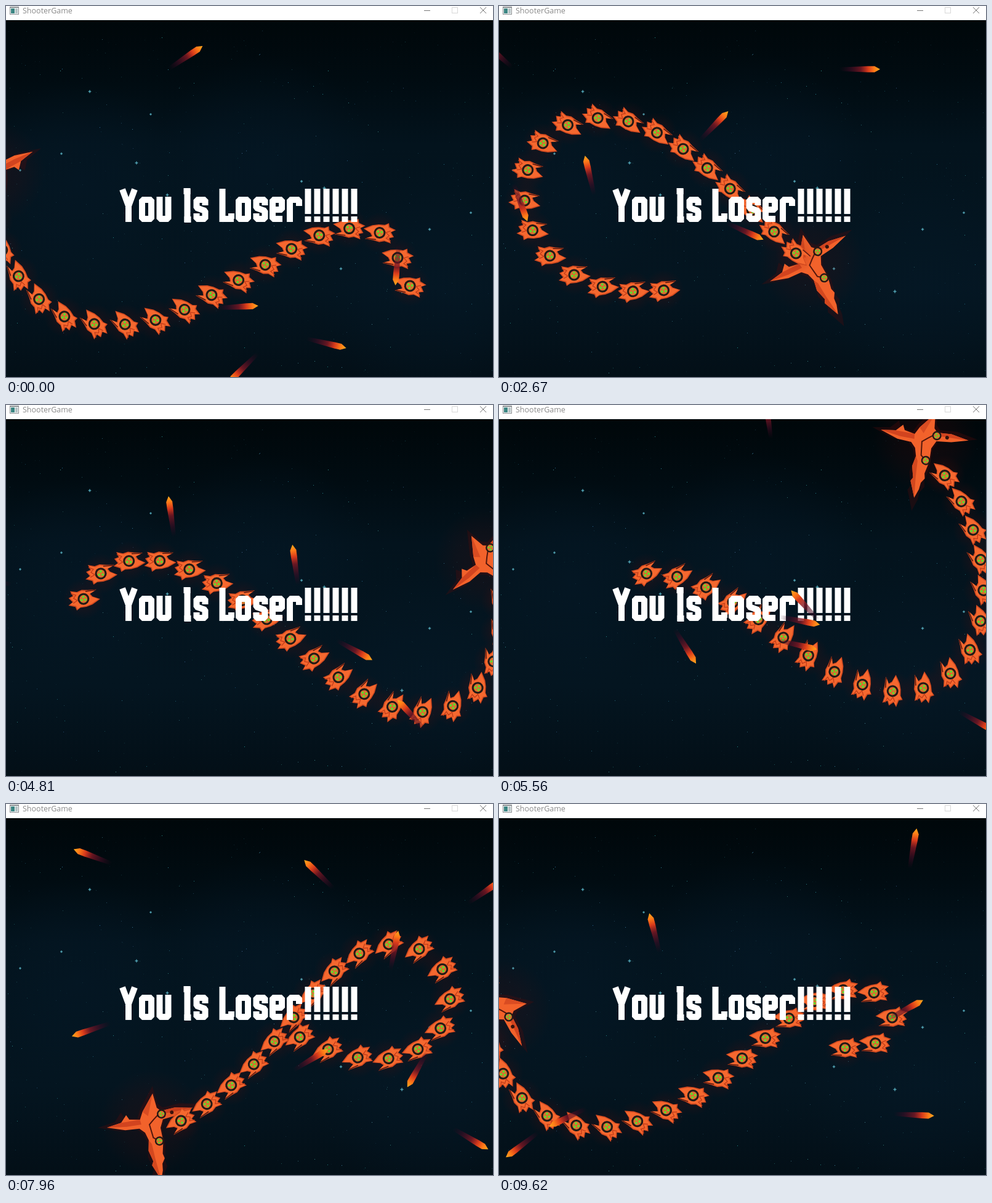
An HTML page with a canvas that plays this animation: 791x603 px, repeating every 9.67 s.

```html
<!DOCTYPE html>
<html lang="en">
<head>
<meta charset="utf-8">
<title>ShooterGame</title>
<style>
html, body { margin: 0; width: 100%; height: 100%; overflow: hidden; background: #020c13; }
canvas { display: block; }
</style>
</head>
<body>
<canvas id="stage" width="791" height="603" aria-label="You Is Loser!!!!!!">You Is Loser!!!!!!</canvas>
<script>
const W = 791, H = 603, LOOP = 9670, STEP = 92.5, LAST = 104;
const LINKS = 19, GAP = 50, RAD = Math.PI / 180;
const canvas = document.getElementById('stage');
const g = canvas.getContext('2d');

// Head route; timed stops also carry a step and a nose angle.
const route = [
  { x: -34, y: 250, step: 0, nose: 241 },
  { x: -26, y: 190 }, { x: 32, y: 108 }, { x: 110, y: 92 },
  { x: 193, y: 127, step: 14, nose: 171 },
  { x: 262, y: 178 }, { x: 340, y: 260 },
  { x: 518, y: 437, step: 29, nose: 63 },
  { x: 597, y: 506 }, { x: 689, y: 561 }, { x: 744, y: 556 },
  { x: 784, y: 518, step: 43, nose: -18 },
  { x: 812, y: 400 }, { x: 800, y: 280 }, { x: 757, y: 147 },
  { x: 688, y: 80, step: 60, nose: 101 },
  { x: 635, y: 95 }, { x: 546, y: 193 }, { x: 490, y: 320 }, { x: 412, y: 433 },
  { x: 241, y: 540, step: 86, nose: 81 },
  { x: 176, y: 562 }, { x: 60, y: 536 }, { x: -5, y: 445 },
  { x: -22, y: 343, step: LAST, nose: 158 }
];
// Where the body lies when the loop begins, head to tail.
const coil = [[-34, 250], [-8, 393], [92, 503], [239, 511], [375, 447], [507, 374], [604, 369], [654, 450]];

const mix = (a, b, u) => a + (b - a) * u;
function group(list, size) {
  const out = [];
  for (let i = 0; i < list.length; i += size) out.push(list.slice(i, i + size));
  return out;
}
function seeded(seed) {
  return () => (seed = seed * 16807 % 2147483647) / 2147483647;
}

// Smooth curve through points: lookup by length, and the length at each point.
function curve(p) {
  const n = p.length - 1, sub = 24, pts = [p[0]], len = [0];
  for (let i = 0; i < n; i++) {
    const a = p[Math.max(0, i - 1)], b = p[i], c = p[i + 1], d = p[Math.min(n, i + 2)];
    for (let s = 1; s <= sub; s++) {
      const u = s / sub;
      pts.push([0, 1].map(k => b[k] + u / 2 * (c[k] - a[k]
        + u * (2 * a[k] - 5 * b[k] + 4 * c[k] - d[k] + u * (3 * (b[k] - c[k]) + d[k] - a[k])))));
    }
  }
  for (let i = 1; i < pts.length; i++)
    len.push(len[i - 1] + Math.hypot(pts[i][0] - pts[i - 1][0], pts[i][1] - pts[i - 1][1]));
  return {
    total: len[len.length - 1],
    lengthAt: i => len[i * sub],
    at(want) {
      let i = 1;
      while (i < len.length - 1 && len[i] < want) i++;
      const u = (want - len[i - 1]) / (len[i] - len[i - 1] || 1);
      return [0, 1].map(k => mix(pts[i - 1][k], pts[i][k], u));
    }
  };
}

// Every link is dragged along at a fixed gap behind the one before it.
function pull(chain) {
  for (let i = 1; i < chain.length; i++) {
    const [hx, hy] = chain[i - 1], dx = chain[i][0] - hx, dy = chain[i][1] - hy;
    const k = GAP / (Math.hypot(dx, dy) || 1);
    chain[i] = [hx + dx * k, hy + dy * k];
  }
}

function buildWorm() {
  const path = curve(route.map(p => [p.x, p.y])), rest = curve(coil), sub = 8;
  const stops = route.map((p, i) => ({ ...p, far: path.lengthAt(i) })).filter(p => 'step' in p);
  const chain = Array.from({ length: LINKS + 1 }, (_, i) => rest.at(rest.total * i / LINKS));
  const worm = [];
  for (let s = 0; s <= LAST * sub; s++) {
    const step = s / sub, next = Math.max(1, stops.findIndex(p => p.step >= step));
    const a = stops[next - 1], b = stops[next], u = (step - a.step) / (b.step - a.step);
    chain[0] = path.at(mix(a.far, b.far, u));
    pull(chain);
    if (s % sub === 0)
      worm.push({ nose: mix(a.nose, b.nose, u * u * (3 - 2 * u)) * RAD, joints: chain.slice() });
  }
  return worm;
}

// Random links spit fireballs in random directions at a steady rate.
function buildShots() {
  const rnd = seeded(4211), shots = [];
  for (let step = -14; step < LAST; step += 2.5) {
    const { joints } = worm[Math.max(0, Math.floor(step))];
    const [x, y] = joints[1 + Math.floor(rnd() * LINKS)];
    shots.push({ step, x, y, angle: rnd() * 2 * Math.PI });
  }
  return shots;
}

function shape(c, flat, fill) {
  c.beginPath();
  group(flat, 2).forEach(([x, y]) => c.lineTo(x, y));
  c.closePath();
  c.fillStyle = fill;
  c.fill();
}
function line(c, flat, color, width) {
  c.beginPath();
  group(flat, 2).forEach(([x, y], i) => i ? c.lineTo(x, y) : c.moveTo(x, y));
  c.strokeStyle = color;
  c.lineWidth = width;
  c.stroke();
}
function disc(c, x, y, r, fill) {
  c.beginPath();
  c.arc(x, y, r, 0, 7);
  c.fillStyle = fill;
  c.fill();
}
function glow(c, x, y, r, rgb, alpha) {
  const f = c.createRadialGradient(x, y, 0, x, y, r);
  f.addColorStop(0, `rgba(${rgb},${alpha})`);
  f.addColorStop(0.55, `rgba(${rgb},${alpha * 0.6})`);
  f.addColorStop(1, `rgba(${rgb},0)`);
  c.fillStyle = f;
  c.fillRect(x - r, y - r, 2 * r, 2 * r);
}
function placed(x, y, angle, paint) {
  g.save();
  g.translate(x, y);
  g.rotate(angle);
  paint();
  g.restore();
}

function buildSky() {
  const sky = document.createElement('canvas');
  sky.width = W;
  sky.height = H;
  const c = sky.getContext('2d'), rnd = seeded(77);
  const base = c.createLinearGradient(0, 23, 0, H);
  [[0, '#00070a'], [0.18, '#010c12'], [0.35, '#03131d'], [0.75, '#041520'], [1, '#030f17']]
    .forEach(s => base.addColorStop(...s));
  c.fillStyle = base;
  c.fillRect(0, 0, W, H);
  [[120, 290, 170], [420, 260, 180], [690, 460, 190]]
    .forEach(([x, y, r]) => glow(c, x, y, r, '5,26,42', 0.4));
  for (let i = 0; i < 420; i++) {
    c.fillStyle = `rgba(${40 + rnd() * 40 | 0},${110 + rnd() * 60 | 0},160,${0.1 + rnd() ** 3 * 0.8})`;
    c.fillRect(rnd() * W | 0, 40 + rnd() * 560 | 0, 1, 1);
  }
  [[136, 139], [235, 176], [212, 255], [262, 307], [90, 240], [23, 267], [480, 285], [517, 296],
    [544, 427], [643, 464], [688, 363], [755, 336]].forEach(([x, y]) => {
    const r = 2 + rnd() * 1.5;
    shape(c, [x - r, y, x - 1, y - 1, x, y - r, x + 1, y - 1, x + r, y, x + 1, y + 1, x, y + r, x - 1, y + 1], '#4b98a8');
  });
  return sky;
}

function eye(x, y, r) {
  disc(g, x, y, r, '#221a16');
  disc(g, x, y, r * 0.68, '#d9702f');
  for (let i = 0; i < 3; i++) {
    const a = i * 2.094 + 0.5;
    disc(g, x + Math.cos(a) * r * 0.36, y + Math.sin(a) * r * 0.36, r * 0.2, '#5ce02a');
  }
}

const shell = [27,2, 14,10, 4,13, -6,14, -12,18, -14,12, -25,9, -18,4, -24,-3, -17,-6, -21,-14,
  -10,-12, -2,-15, 8,-14, 22,-14, 11,-8, 15,-3];
function drawLink() {
  glow(g, 0, 0, 33, '110,12,8', 0.2);
  shape(g, shell, '#d24a20');
  g.save();
  g.scale(0.9, 0.88);
  shape(g, shell, '#f5682f');
  g.restore();
  line(g, [-20, -10, -12, -7, -16, -2, -10, 2, -17, 6], '#c23c1a', 1.3);
  line(g, [4, -12, 20, -13], '#551910', 1.5);
  eye(0, 0, 9.5);
}

const hull = [72,0, 55,7, 46,11, 40,8, 22,13, 5,10, -8,14, -16,22, -17,45, -26,74, -30,50, -41,40,
  -33,36, -30,19, -42,13, -69,-8, -45,-11, -39,-17, -41,-40, -36,-69, -28,-42, -25,-18, -12,-12,
  10,-13, 30,-9, 38,-11, 46,-6, 57,-5];
function drawHead() {
  glow(g, -24, 0, 85, '100,10,8', 0.18);
  g.save();
  g.translate(-18, 0);
  g.scale(1.24, 1.2);
  g.translate(18, 0);
  shape(g, hull, 'rgba(85,10,10,0.3)');
  g.restore();
  shape(g, hull, '#f2622b');
  shape(g, [72,0, 46,11, 40,8, 22,13, 5,10, 12,6, 38,4], '#d3481f');
  shape(g, [-30,19, -30,50, -26,74, -22,42, -22,18], '#d2441f');
  shape(g, [-36,-69, -41,-40, -39,-17, -34,-24], '#d2441f');
  shape(g, [-69,-8, -42,13, -34,5], '#d94c22');
  line(g, [9, -7, 2, 2, -20, 5, -27, -3, -34, -12], '#52170d', 2);
  eye(9, -7, 7.5);
  eye(-34, -17, 7.5);
  disc(g, -34, -34, 3, '#35130d');
}

function drawFireball() {
  const f = g.createLinearGradient(0, 0, -66, 0);
  [[0, '#ffac1c'], [0.14, '#ff7c18'], [0.3, '#d83a1b'], [0.48, 'rgba(130,24,36,.8)'],
    [0.75, 'rgba(70,12,38,.5)'], [1, 'rgba(50,8,30,0)']].forEach(s => f.addColorStop(...s));
  shape(g, [0,0, -9,-5, -20,-5, -66,-3, -66,3, -20,5, -9,5], f);
}

// Block lettering: stroke paths relative to each letter's left edge and the baseline.
const glyphs = {
  o: [[5,-36, 20,-36, 20,-5, 5,-5, 5,-36, 12,-36]],
  u: [[5,-41, 5,-5, 19,-5, 19,-41]],
  s: [[19,-27, 19,-36, 5,-36, 5,-23, 19,-18, 19,-5, 5,-5, 5,-14]],
  e: [[21,-5, 5,-5, 5,-36, 20,-36, 20,-20, 8,-20]],
  r: [[5,0, 5,-36, 20,-36, 20,-26]],
  I: [[7,-54, 7,0], [1,-50, 12,-50], [2,-4, 13,-4]],
  L: [[5.5,-54, 5.5,0], [1,-5, 24,-5], [20,-5, 20,-14]],
  Y: [[5,-53, 15,-26, 25,-53], [15,-29, 15,0]],
  '!': [[5.5,-54, 5.5,-13], [5.5,-9, 5.5,0]]
};
const advance = { Y: 32, o: 28.5, u: 28, I: 17, s: 26.5, L: 27, e: 28, r: 29, '!': 15, ' ': 15 };
function drawLettering() {
  let x = 184;
  g.lineJoin = 'bevel';
  for (const ch of 'You Is Loser!!!!!!') {
    for (const path of glyphs[ch] || [])
      line(g, path.map((v, i) => v + (i % 2 ? 351 : x)), '#fff', 10);
    x += advance[ch];
  }
  g.lineJoin = 'miter';
}

function drawTitleBar() {
  g.fillStyle = '#fff';
  g.fillRect(0, 0, W, 23);
  g.fillStyle = '#8b8f92';
  g.fillRect(6, 1, 15, 13);
  g.fillStyle = '#f3f5f5';
  g.fillRect(7, 3, 13, 10);
  g.fillStyle = '#3b8582';
  g.fillRect(8, 4, 6, 8);
  g.fillStyle = '#b5c4c6';
  g.fillRect(15, 4, 4, 8);
  g.fillStyle = '#8a8a8a';
  g.font = '12.5px "Open Sans", sans-serif';
  g.fillText('ShooterGame', 27, 12);
  line(g, [679, 7.5, 689, 7.5], '#777', 1);
  g.strokeStyle = '#d8d8d8';
  g.strokeRect(724.5, 2.5, 9, 9);
  line(g, [770, 2, 780, 12], '#777', 1);
  line(g, [780, 2, 770, 12], '#777', 1);
}

const sky = buildSky(), worm = buildWorm(), shots = buildShots();

function draw(step) {
  g.drawImage(sky, 0, 0);
  const { nose, joints } = worm[step], [hx, hy] = joints[0];
  placed(hx, hy, nose, drawHead);
  for (const [x, y] of joints.slice(1))
    placed(x, y, Math.atan2(hy - y, hx - x), drawLink);
  drawLettering();
  for (const { step: born, x, y, angle } of shots) {
    const run = (step - born) * 30;
    if (run >= 0) placed(x + Math.cos(angle) * run, y + Math.sin(angle) * run, angle, drawFireball);
  }
  drawTitleBar();
}

const start = performance.now();
let shown = -1;
function tick() {
  const t = (performance.now() - start) % LOOP;
  const step = Math.min(LAST, Math.floor((t + 15) / STEP));
  if (step !== shown) draw(shown = step);
  requestAnimationFrame(tick);
}
tick();
</script>
</body>
</html>
```
